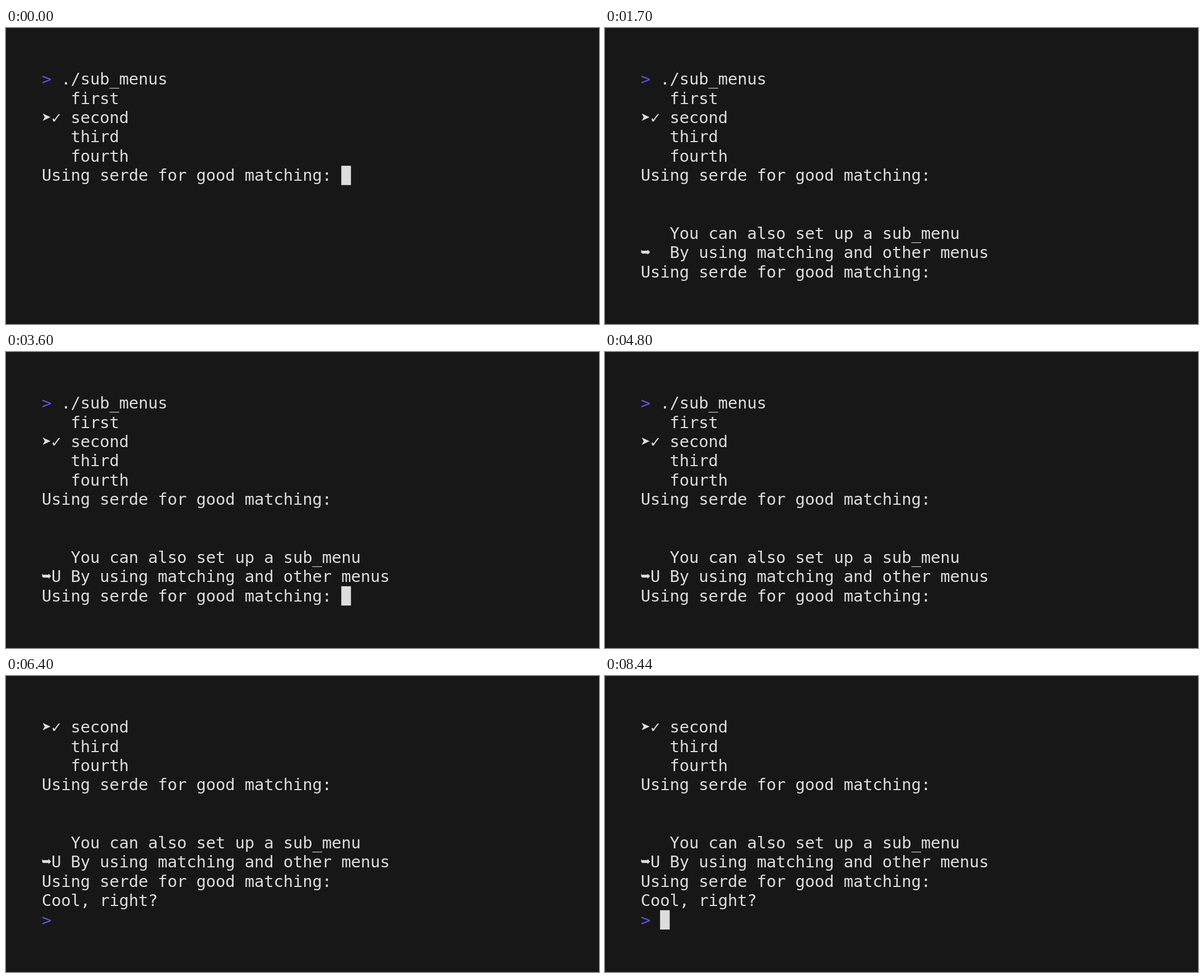
Recreate the animation shown at these times as an HTML page with a canvas. Size 1058 by 529 pixels, loop 8800 ms.

```html
<!DOCTYPE html>
<html lang="en">
<head>
<meta charset="utf-8">
<title>Sub menus</title>
<style>
  html, body { margin: 0; width: 100%; height: 100%; overflow: hidden; background: #171717; }
  canvas { display: block; }
</style>
</head>
<body>
<canvas id="stage" width="1058" height="529"></canvas>
<script>
const ctx = document.getElementById("stage").getContext("2d");

const LOOP = 8800;
const BACK = "#171717", TEXT = "#dddddd", PROMPT = "#5a56e0";

// Terminal grid: cells of 19 x 38 units, scaled to the stage
const SCALE = 0.9074, LEFT = 63.75, TOP = 73.8;
const CELL_W = 19, CELL_H = 38, BASELINE = 30;

const QUESTION = "Using serde for good matching:";
const MENU = ["> ./sub_menus", "   first", "➤✓ second", "   third", "   fourth", QUESTION];
const subMenu = mark => ["", "", "   You can also set up a sub_menu",
  `➥${mark} By using matching and other menus`, QUESTION];

const opened = [...MENU, ...subMenu(" ")];
const chosen = [...MENU, ...subMenu("U")];
const answered = [...chosen.slice(2), "Cool, right?"];

const SCREENS = [
  { at: 0, lines: MENU },
  { at: 1700, lines: opened },
  { at: 3580, lines: chosen },
  { at: 5180, lines: answered },
  { at: 5200, lines: [...answered, ">"] }
];

// Times at which the cursor turns on or off, starting with on
const BLINKS = [0, 440, 860, 1280, 1720, 2380, 2800, 3200, 3600, 3980, 4400, 4800,
  5200, 5600, 6020, 6400, 6820, 7220, 7620, 8040, 8440];

function drawLine(line, row) {
  [...line].forEach((char, col) => {
    if (char === " ") return;
    ctx.fillStyle = char === ">" ? PROMPT : TEXT;
    ctx.fillText(char, col * CELL_W, row * CELL_H + BASELINE);
  });
}

function drawCursor(lines) {
  const row = lines.length - 1;
  ctx.fillStyle = TEXT;
  ctx.fillRect((lines[row].length + 1) * CELL_W, row * CELL_H, CELL_W, CELL_H);
}

function draw(t) {
  const { lines } = SCREENS.findLast(screen => t >= screen.at);
  const cursorOn = BLINKS.filter(time => t >= time).length % 2 === 1;

  ctx.setTransform(1, 0, 0, 1, 0, 0);
  ctx.fillStyle = BACK;
  ctx.fillRect(0, 0, 1058, 529);

  ctx.setTransform(SCALE, 0, 0, SCALE, LEFT, TOP);
  ctx.font = '32px "DejaVu Sans Mono", monospace';
  lines.forEach(drawLine);
  if (cursorOn) drawCursor(lines);
}

const start = performance.now();
function tick() {
  draw((performance.now() - start) % LOOP);
  requestAnimationFrame(tick);
}
tick();
</script>
</body>
</html>
```
